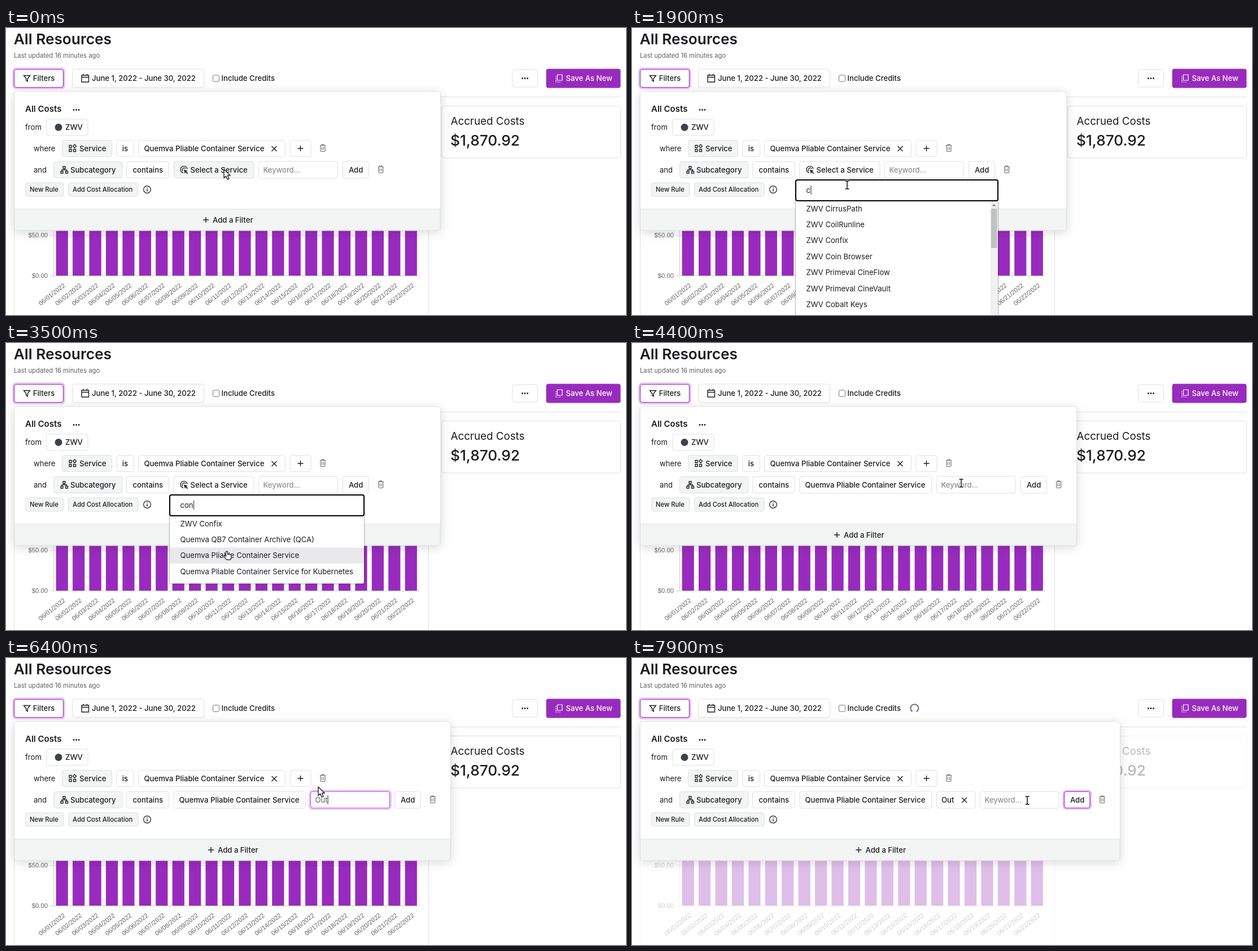
Animation, 1098 px wide and 510 px high, one loop 8000 ms. Source, as an HTML page:

```html
<!DOCTYPE html>
<html lang="en">
<head>
<meta charset="utf-8">
<title>Cost filters</title>
<style>
html, body { margin: 0; width: 100%; height: 100%; overflow: hidden; background: #fff; }
svg { display: block; width: 1098px; height: 510px; font-family: Inter, sans-serif; }
text { white-space: pre; }
.axis { font: 11.25px "Liberation Sans", sans-serif; fill: #666; text-anchor: end; }
</style>
</head>
<body>
<svg id="stage" viewBox="0 0 1098 510" xmlns="http://www.w3.org/2000/svg"></svg>
<script>
const LOOP = 8000, STEP = 100;
const PURPLE = '#982bbd', HALO = '#ecc3f7', INK = '#1b1c20', LINE = '#dfe0e2', GRAY = '#f3f4f4';
const SIZE = 13.125, ROW = 28.35, LIST_TOP = 307;
const SERVICE = 'Quemva Pliable Container Service';
const SERVICES = [
  'ZWV CirrusPath', 'ZWV CoilRunline', 'ZWV Confix', 'ZWV Coin Browser', 'ZWV Byte Transfer',
  'ZWV Primeval CineFlow', 'ZWV Primeval CineVault', 'ZWV Cobalt Keys', 'ZWV Secret Locker',
  'Quemva Cohort Pool', 'Quemva Comet Lens', 'Quemva QB7 Container Archive (QCA)',
  SERVICE, SERVICE + ' for Kubernetes'
];

const stage = document.getElementById('stage');
const pen = document.createElement('canvas').getContext('2d');

const within = (t, a, b) => t >= a && t < b;
const clamp = v => Math.max(0, Math.min(1, v));
const attrs = o => Object.entries(o).map(([k, v]) => ` ${k}="${v}"`).join('');

function textWidth(s) {
  pen.font = `${SIZE}px Inter, sans-serif`;
  return pen.measureText(s).width;
}

// Text is placed by the vertical centre of its capitals.
function text(x, cy, s, o = {}) {
  const { size = SIZE, weight = 500, fill = INK, anchor = 'start' } = o;
  return `<text${attrs({ x, y: (cy + size * 0.3636).toFixed(2), 'font-size': size,
    'font-weight': weight, fill, 'text-anchor': anchor })}>${s}</text>`;
}

const plain = (x, cy, s, fill = INK) => text(x, cy, s, { weight: 400, fill });

function rect(x, y, x2, y2, o = {}) {
  return `<rect${attrs({ x, y, width: x2 - x, height: y2 - y, rx: 4, fill: '#fff', ...o })}/>`;
}

const line = (d, o = {}) =>
  `<path${attrs({ d, fill: 'none', stroke: INK, 'stroke-width': 1.4, ...o })}/>`;

const chip = (x, x2, cy, fill = '#fff', h = 14.5) =>
  rect(x + 0.5, cy - h, x2 - 0.5, cy + h, { fill, stroke: LINE });

function focusRing(x, x2, y, y2, opacity = 1, stroke = PURPLE) {
  return `<g opacity="${opacity}">`
    + rect(x - 1.2, y - 1.2, x2 + 1.2, y2 + 1.2, { fill: 'none', stroke: HALO, 'stroke-width': 3.2, rx: 5 })
    + rect(x + 0.5, y + 0.5, x2 - 0.5, y2 - 0.5, { stroke, 'stroke-width': 1.2 }) + '</g>';
}

const dots = (x, y) => [-4.5, 0, 4.5]
  .map(d => `<circle cx="${x + d}" cy="${y}" r="1.4" fill="${INK}"/>`).join('');
const plus = (x, y) => line(`M${x - 5} ${y}h10M${x} ${y - 5}v10`);
const cross = (x, y) => line(`M${x - 4.5} ${y - 4.5}l9 9m0 -9l-9 9`);
const caret = (x, cy) => line(`M${x} ${cy - 8}v16`, { 'stroke-width': 1 });

const trash = (x, y) => line(
  `M${x - 5.2} ${y - 4.8}h10.4M${x - 2} ${y - 5}v-1.4h4v1.4M${x - 4} ${y - 4.5}v9.3q0 1.2 1.2 1.2h5.6q1.2 0 1.2 -1.2v-9.3`
  + `M${x - 1.5} ${y - 2}v5.2m3 0v-5.2`, { stroke: '#6c6e73', 'stroke-width': 1.1 });

const targetIcon = (x, y) =>
  line(`M${x - 1} ${y + 6}A6 6 0 1 1 ${x + 6} ${y - 1}M${x - 2} ${y + 3}A3.4 3.4 0 1 1 ${x + 3.4} ${y - 1.6}`)
  + line(`M${x} ${y}l7 2.4l-2.8 1.2l3 3l-1.2 1.2l-3 -3l-1.2 2.6z`, { fill: INK, stroke: 'none' });

function header() {
  return text(13.7, 19.2, 'All Resources', { size: 26.25, weight: 600 })
    + text(14, 48.6, 'Last updated 16 minutes ago', { size: 11.25, weight: 400, fill: '#5d6066' })
    + focusRing(14, 102, 73, 106)
    + line('M31.5 84.5h11l-4.2 5.2v5l-2.6 -1.7v-3.3z')
    + text(47.7, 89.5, 'Filters')
    + chip(117, 351, 89.5, '#fff', 16.5)
    + line('M134 84h12.5v12h-12.5zM134 87.5h12.5M137 81.5v3M143.5 81.5v3')
    + text(152, 89.5, 'June 1, 2022 - June 30, 2022')
    + rect(366.5, 83.8, 377.5, 95.2, { rx: 2, stroke: '#73757a' })
    + text(381.5, 89.5, 'Include Credits')
    + chip(896, 942, 89.5, '#fff', 15.5) + dots(919, 89.5)
    + rect(956.6, 72.6, 1088.4, 106.4, { fill: PURPLE })
    + line('M976.5 83h8.5v10h-8.5z', { stroke: '#fff', 'stroke-width': 1.2 })
    + line('M974 85.5v10.5h9', { stroke: '#fff', 'stroke-width': 1.2, 'stroke-dasharray': '2 1.2' })
    + text(991.5, 89.5, 'Save As New', { fill: '#fff' })
    + line('M14 122.5H1088', { stroke: LINE, 'stroke-width': 1 });
}

function report(opacity) {
  let s = `<g opacity="${opacity}">`
    + rect(771.5, 138.5, 1088.5, 231, { stroke: LINE })
    + text(787.5, 165.4, 'Accrued Costs', { size: 18.75, weight: 400 })
    + text(787, 199.1, '$1,870.92', { size: 26.25 })
    + rect(14.5, 138.5, 748.5, 540, { stroke: LINE })
    + line('M78 368.5H732', { stroke: '#e2e2e2', 'stroke-width': 1 })
    + line('M78 440.5H732M84.5 350V440', { stroke: '#d0d0d0', 'stroke-width': 1 })
    + '<text class="axis" x="74" y="372.3">$50.00</text><text class="axis" x="74" y="444">$0.00</text>';
  for (let i = 0; i < 22; i++) {
    const x = 99.2 + i * 29.43, day = String(i + 1).padStart(2, '0');
    s += rect(x - 10.6, 300, x + 10.6, 440, { rx: 0, fill: PURPLE })
      + `<text class="axis" transform="translate(${x + 6.4} 458.8) rotate(-38.5)">06/${day}/2022</text>`;
  }
  return s + '</g>';
}

function keywordField(x, t, typed) {
  const focused = within(t, 4600, 7300);
  const blink = within(t, 5200, 5400) || within(t, 6900, 7300);
  return (focused ? focusRing(x, x + 141, 237, 267, t < 4700 ? 0.5 : 1, '#b566d3')
                  : chip(x, x + 141, 252, '#fff', 15))
    + plain(x + 8.5, 252, typed || 'Keyword...', typed ? '#56585e' : '#7b7d84')
    + (focused && !blink ? caret(x + 9 + textWidth(typed), 252) : '');
}

function panel(t) {
  const picked = t >= 3700, added = t >= 7500;
  const right = added ? 864.5 : picked ? 787.5 : 769.5;
  const mid = (14.5 + right) / 2;
  const typed = added || t < 5400 ? '' : 'Out'.slice(0, t < 5700 ? 1 : t < 5900 ? 2 : 3);
  const field = added ? 616 : picked ? 539 : 447;
  const add = field + 149;

  let s = rect(14.5, 113, right, 360, { rx: 5, filter: 'url(#soft)', stroke: LINE })
    + line(`M15 321.5H${right - 0.5}V355q0 4.5 -4.5 4.5H19.5q-4.5 0 -4.5 -4.5z`,
      { fill: GRAY, stroke: '#e3e5e6', 'stroke-width': 1 })
    + plus(mid - 38, 341) + text(mid - 26, 341, 'Add a Filter')
    + text(34, 144, 'All Costs', { size: 15, weight: 600 }) + dots(124.5, 145.5)
    + plain(34, 176, 'from') + chip(71, 145.5, 176.5)
    + '<circle cx="93" cy="176.5" r="6.5" fill="#3a424e"/>' + text(105, 176.5, 'ZWV')
    + plain(49, 214, 'where')
    + chip(99, 188, 214, GRAY)
    + line('M112 208.5h4v4h-4zM112 215.5h4v4h-4zM119.5 215.5h4v4h-4zM121.5 207l3 3l-3 3l-3 -3z', { 'stroke-width': 1.3 })
    + text(130, 214, 'Service')
    + chip(195.5, 227, 214) + text(211, 214, 'is', { anchor: 'middle' })
    + chip(234, 495, 214) + text(244.5, 214, SERVICE) + cross(475, 214.5)
    + chip(502.5, 540.5, 214) + plus(521.5, 214) + trash(561, 213.5)
    + plain(49, 252, 'and')
    + chip(84, 206.5, 252, GRAY)
    + line('M101 246h4v3.5h-4zM97 254.5h4v3.5h-4zM105.500 254.5h4v3.5h-4zM103 249.5v2.5M99 254.5v-2.5h8.5v2.5', { 'stroke-width': 1.3 })
    + text(114, 252, 'Subcategory')
    + chip(213, 289, 252) + text(224.5, 252, 'contains');

  if (picked) {
    s += chip(296.5, 531, 252, '#fff', 15) + text(306.5, 252, SERVICE);
  } else {
    s += chip(296.5, 439.5, 252, t < 600 ? GRAY : '#fff', 15);
    if (within(t, 100, 1200)) s += focusRing(297, 439, 237, 267, t === 100 || t === 1100 ? 0.5 : 1);
    s += targetIcon(315, 251.5) + text(326.6, 252, 'Select a Service');
  }
  if (added) s += chip(539, 608.5, 252, '#fff', 15) + text(548, 252, 'Out') + cross(588.5, 252.5);

  s += keywordField(field, t, typed)
    + (t >= 7300 ? focusRing(add, add + 46.5, 237, 267) : chip(add, add + 47, 252, '#fff', 15))
    + text(add + 23.6, 252, 'Add', { anchor: 'middle' })
    + trash(add + 67.7, 251.5);

  const small = { size: 11.25 };
  return s + chip(34, 102.5, 287, GRAY, 12) + text(42, 287, 'New Rule', small)
    + chip(110, 234.5, 287, GRAY, 12) + text(118, 287, 'Add Cost Allocation', small)
    + `<circle cx="250" cy="287" r="6.4" fill="none" stroke="${INK}" stroke-width="1.2"/>`
    + line('M250 286v4.5M250 283.3v1.5');
}

function dropdown(t, cursor) {
  if (!within(t, 300, 3700)) return '';
  const query = 'con'.slice(0, t < 1900 ? 0 : t < 2200 ? 1 : t < 2400 ? 2 : 3);
  const items = SERVICES.filter(s => s.toLowerCase().includes(query));
  const long = query.length < 3;
  const right = long ? 648.5 : 634.5, bottom = long ? 540 : 428;
  const hover = cursor.kind === 'hand' ? Math.floor((cursor.y - LIST_TOP) / ROW) : -1;

  let s = rect(290, 270, right - 0.5, bottom - 0.5, { rx: 3, filter: 'url(#near)' })
    + rect(289.5, 269.5, right, bottom, { rx: 3.5, fill: 'none', stroke: '#000', 'stroke-opacity': 0.2 })
    + line(`M290 306.5H${right}`, { stroke: LINE, 'stroke-width': 1 });
  items.forEach((name, i) => {
    const cy = 321 + i * ROW;
    if (cy > 520) return;
    if (i === hover) s += rect(290, cy - ROW / 2, right - 0.5, cy + ROW / 2, { rx: 0, fill: '#e9e9ec' });
    s += plain(308.5, cy, name);
  });
  if (long) {
    const thumb = [37, 70, 140][query.length];
    s += rect(634.5, 307, 648, 520, { rx: 0, fill: '#f1f1f1' })
      + rect(636, 321, 646.5, 321 + thumb, { rx: 0, fill: '#c1c1c1' })
      + line('M637.5 316.5l3.5 -4l3.5 4z', { fill: '#8b8b8b', stroke: 'none' });
  }
  if (t >= 1100) s += rect(290, 270, right - 0.5, 307, { rx: 3, stroke: '#000', 'stroke-width': 2 });
  s += plain(308.5, 288, query || 'Find service...', query ? INK : '#808289');
  const blink = within(t, 1700, 1900) || within(t, 2900, 3500);
  if (t >= 1100 && !blink) s += caret(309.5 + textWidth(query), 288);
  return s;
}

// time, x, y, pointer shape
const PATH = [
  [0, 386, 251, 'arrow'], [500, 386, 251, 'arrow'], [700, 382, 275, 'beam'], [900, 381, 279, 'beam'],
  [2600, 381, 279, 'beam'], [2900, 307, 272, 'beam'], [3000, 307, 272, 'beam'],
  [3100, 335, 316, 'hand'], [3300, 391, 370, 'hand'], [3700, 391, 370, 'arrow'],
  [3900, 391, 370, 'arrow'], [4200, 535, 278, 'arrow'], [4400, 583, 249, 'beam'],
  [5800, 583, 249, 'beam'], [6000, 675, 246, 'beam'], [6200, 675, 246, 'beam'],
  [6400, 553, 229, 'arrow'], [6600, 553, 229, 'arrow'], [6700, 575, 240, 'beam'],
  [7100, 692, 252, 'hand'], [7300, 700, 253, 'hand'], [7500, 700, 253, 'beam'], [LOOP, 700, 253, 'beam']
];

function cursorAt(t) {
  const i = PATH.findIndex((p, n) => n + 1 < PATH.length && t < PATH[n + 1][0]);
  const [t0, x0, y0, kind] = PATH[i], [t1, x1, y1] = PATH[i + 1];
  const k = (t - t0) / (t1 - t0);
  return { x: x0 + (x1 - x0) * k, y: y0 + (y1 - y0) * k, kind };
}

const POINTERS = {
  arrow: line('M0 0V15.5L3.6 12.2L6.2 18.2L9 17L6.5 11.2H11.3z',
    { fill: '#fff', stroke: '#111', 'stroke-width': 1.3, 'stroke-linejoin': 'round' }),
  beam: (d => line(d, { stroke: '#fff', 'stroke-width': 3.4 }) + line(d, { stroke: '#111', 'stroke-width': 1.5 }))(
    'M-3.5 -7h2.5l1 1l1 -1h2.5M-3.5 7h2.5l1 -1l1 1h2.5M0 -6v12'),
  hand: line('M-1.5 1q1.5 -1.8 3 0v4.5q1.3 -1 2.3 .2q1.2 -.7 2.2 .4q1.8 -.5 2 1.3v3.6l-1.5 4.2h-7l-4 -5.4q-1.2 -2 .8 -2.2l2.2 1.6z',
    { fill: '#fff', stroke: '#111', 'stroke-width': 1.2, 'stroke-linejoin': 'round' })
};

function spinner(t) {
  if (t < 7500) return '';
  const turn = (t - 7900) * 0.36;
  return line('M496.5 95.2A7 7 0 1 1 503.5 95.6',
    { stroke: '#696c98', 'stroke-width': 2, transform: `rotate(${turn} 500 89.5)` });
}

const DEFS = `<defs>
  <filter id="soft" x="-10%" y="-20%" width="120%" height="140%">
    <feDropShadow dx="0" dy="3" stdDeviation="8.5" flood-opacity=".15"/></filter>
  <filter id="near" x="-5%" y="-5%" width="110%" height="110%">
    <feDropShadow dx="0" dy="1" stdDeviation="2" flood-opacity=".16"/></filter>
</defs>`;

function draw(t) {
  const cursor = cursorAt(t);
  const fade = 1 - 0.7 * clamp((t - 7400) / 400);
  stage.innerHTML = DEFS + report(fade) + header() + spinner(t) + panel(t) + dropdown(t, cursor)
    + `<g transform="translate(${cursor.x} ${cursor.y})">${POINTERS[cursor.kind]}</g>`;
}

let start, shown = -1;
function tick(now) {
  start ??= now;
  const t = Math.floor((now - start) % LOOP / STEP) * STEP;
  if (t !== shown) draw(shown = t);
  requestAnimationFrame(tick);
}
draw(0);
requestAnimationFrame(tick);
</script>
</body>
</html>
```
